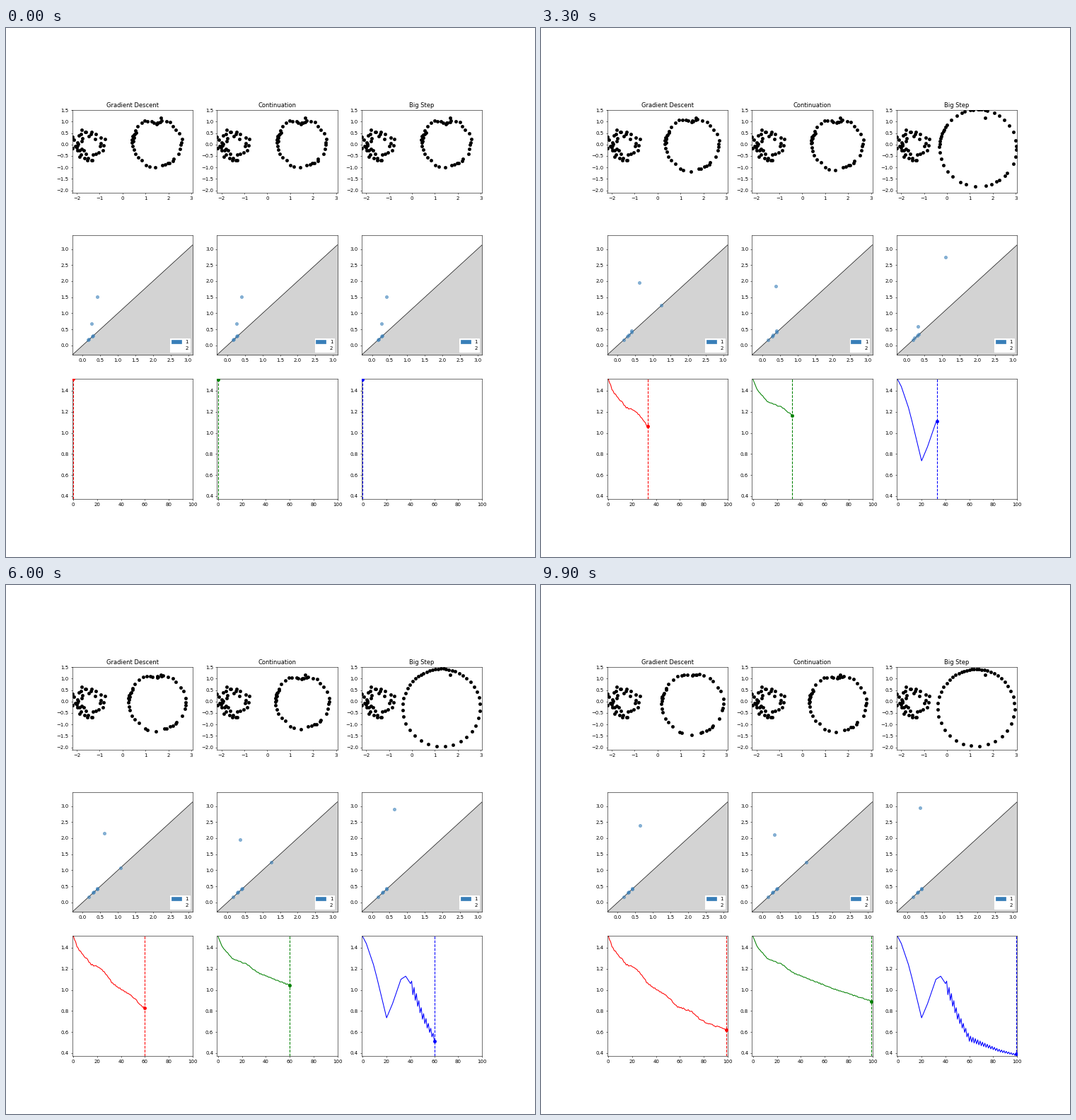
Animation of 748 by 748 pixels, one loop 10000 ms. Source, as a matplotlib script:

```python
import matplotlib.pyplot as plt
import numpy as np
from matplotlib.animation import FuncAnimation
from matplotlib.patches import Patch

STEPS = 100
steps = np.arange(STEPS)
rng = np.random.default_rng(4)
BLUE = "#377eb8"


def polar(center, radius, angle):
    return np.column_stack([center[0] + radius * np.cos(angle),
                            center[1] + radius * np.sin(angle)])


# Small noisy circle, denser on its left, and one outlier above the large one
u = np.linspace(0, 2 * np.pi, 42, endpoint=False)
small = polar((-1.47, -.03), .56 + .11 * rng.standard_normal(42),
              u + .4 * np.sin(u) + .08 * rng.standard_normal(42))
still = np.vstack([small, [1.67, 1.18]])

# Large noisy circle: uneven angles, dented at the top
COUNT = 45
START = np.array([1.50, .08])
ang0 = np.interp(np.arange(COUNT),
                 [0, 5, 7, 10, 13, 16, 20, 24, 27, 31, 36, 39, 42, 44],
                 [-76, -43, -14, 8, 45, 77, 92, 118, 150, 165, 178, 205, 243, 266])
rad0 = (1.05 - .2 * np.exp(-((ang0 - 90) / 14) ** 2)
        + .06 * rng.uniform(-1, 1, COUNT))
ang0 = np.radians(ang0 + rng.uniform(-2, 2, COUNT))


def cloud(center, radius, angle, move, grow, turn):
    """Large circle on its way to a new center, radius and set of angles."""
    ring = polar(START + move * (center - START),
                 rad0 + grow * (radius - rad0),
                 ang0 + turn * (angle - ang0))
    return np.vstack([still, ring])


# Gradient descent gathers the points in clumps 20 degrees apart
clumped = ang0 - np.sin(18 * (ang0 - np.radians(9))) / 20
# Big steps spread them smoothly, closest together near the top
v = np.linspace(-np.pi, np.pi, COUNT, endpoint=False)
spread = np.radians(95) + v - .55 * np.sin(v)


def descent_cloud(t):
    p = (t / 99) ** .9
    return cloud(np.array([1.52, -.10]), 1.33 + .4 * (rad0 - 1.03),
                 clumped, p, p, p)


def continuation_cloud(t):
    p = t / 99
    return cloud(np.array([1.55, -.07]), 1.22 + .6 * (rad0 - 1.03),
                 ang0, p, p, p)


def big_step_cloud(t):
    grow = np.interp(t, [0, 12, 33, 50, 99], [0, .38, 1, 1.03, 1])
    turn = np.interp(t, [0, 33, 50, 99], [0, .2, .85, 1])
    return cloud(np.array([1.28, -.27]), 1.68, spread, min(t / 50, 1), grow, turn)


def fade(t):
    return 1 - np.exp(-t / 17)


def late_fade(t):
    s = np.clip((t - 22) / 28, 0, 1)
    return s * s * (3 - 2 * s)


def diagram(births, deaths, merge, brief, t):
    """Main pair, a second one merging into the diagonal, and short-lived ones."""
    keys = [0, 12, 33, 50, 99]
    w = merge(t)
    low = np.array([.16, .18, .27, .29]) + w * np.array([.01, .11, .04, .12])
    low = np.append(low, [b for first, last, b in brief if first <= t <= last])
    main = [np.interp(t, keys, births), np.interp(t, keys, deaths)]
    second = [.26 + .16 * w, .68 - .25 * w]
    return np.vstack([main, second, np.column_stack([low, low + .012])])


def curve(x, y, noise=0):
    return np.interp(steps, x, y) + noise * rng.uniform(-1, 1, STEPS)


descent_loss = curve([0, 4, 12, 15, 20, 25, 33, 50, 58, 69, 77, 85, 99],
                     [1.505, 1.39, 1.285, 1.24, 1.22, 1.18, 1.06, .93, .84,
                      .80, .72, .675, .62], .008)
continuation_loss = curve([0, 3, 12, 24, 33, 50, 69, 85, 99],
                          [1.505, 1.42, 1.293, 1.245, 1.165, 1.088, 1.005,
                           .945, .895], .005)
# Past its second peak the big step loss zigzags with falling strength
zigzag = np.where(steps > 40, -.045 * (-1.0) ** steps * np.exp((45 - steps) / 30), 0)
big_step_loss = zigzag + curve(
    [0, 3, 9, 12, 20, 25, 32, 36, 40, 45, 50, 60, 70, 85, 99],
    [1.505, 1.44, 1.24, 1.11, .735, .87, 1.10, 1.13, 1.06, .92, .76, .54,
     .49, .425, .385])

# Title, color, cloud, arguments of diagram, loss
METHODS = [
    ("Gradient Descent", "red", descent_cloud,
     ([.41, .50, .62, .60, .63], [1.52, 1.72, 1.95, 2.08, 2.40], fade,
      [(25, 40, 1.24), (60, 75, 1.07)]), descent_loss),
    ("Continuation", "green", continuation_cloud,
     ([.41, .36, .38, .36, .34], [1.52, 1.72, 1.84, 1.92, 2.11], fade,
      [(40, 99, 1.25)]), continuation_loss),
    ("Big Step", "blue", big_step_cloud,
     ([.41, .57, 1.10, .71, .37], [1.52, 1.92, 2.74, 2.89, 2.94], late_fade,
      []), big_step_loss),
]

fig, axes = plt.subplots(3, 3, figsize=(14.96, 14.96), dpi=50)


def setup_cloud(ax, title):
    ax.set_title(title)
    ax.set(xlim=(-2.2, 3.062), ylim=(-2.1, 1.5),
           xticks=range(-2, 4), yticks=np.arange(-2, 1.6, .5))
    ax.set_aspect("equal")
    return ax.scatter([], [], color="black")


def setup_diagram(ax):
    lo, hi = -.3, 3.13
    ax.fill_between([lo, hi], [lo, hi], lo, color="#d3d3d3")
    ax.plot([lo, hi], [lo, hi], color="black", lw=1)
    ax.set(xlim=(lo, hi), ylim=(lo, 3.43),
           xticks=np.arange(0, 3.1, .5), yticks=np.arange(0, 3.1, .5))
    ax.legend(handles=[Patch(color=BLUE, label="1"),
                       Patch(color="white", label="2")],
              loc="lower right", framealpha=1)
    return ax.scatter([], [], alpha=.6, color=BLUE, zorder=3)


def setup_loss(ax, color):
    ax.set(xlim=(-1, 100), ylim=(.375, 1.511),
           xticks=range(0, 101, 20), yticks=np.arange(.4, 1.5, .2))
    line, = ax.plot([], [], color=color)
    cursor = ax.axvline(0, color=color, ls="--")
    dot = ax.scatter([], [], color=color, zorder=3)
    return line, cursor, dot


artists = []
for col, (title, color, *_) in enumerate(METHODS):
    artists.append((setup_cloud(axes[0, col], title),
                    setup_diagram(axes[1, col]),
                    *setup_loss(axes[2, col], color)))


def update(t):
    for (_, _, points_at, pairs, loss), parts in zip(METHODS, artists):
        points, diag, line, cursor, dot = parts
        points.set_offsets(points_at(t))
        diag.set_offsets(diagram(*pairs, t))
        line.set_data(steps[:t + 1], loss[:t + 1])
        cursor.set_xdata([t, t])
        dot.set_offsets([[t, loss[t]]])
    return [a for parts in artists for a in parts]


anim = FuncAnimation(fig, update, frames=STEPS, interval=100,
                     repeat=True, repeat_delay=0, blit=False)
plt.show()
```
